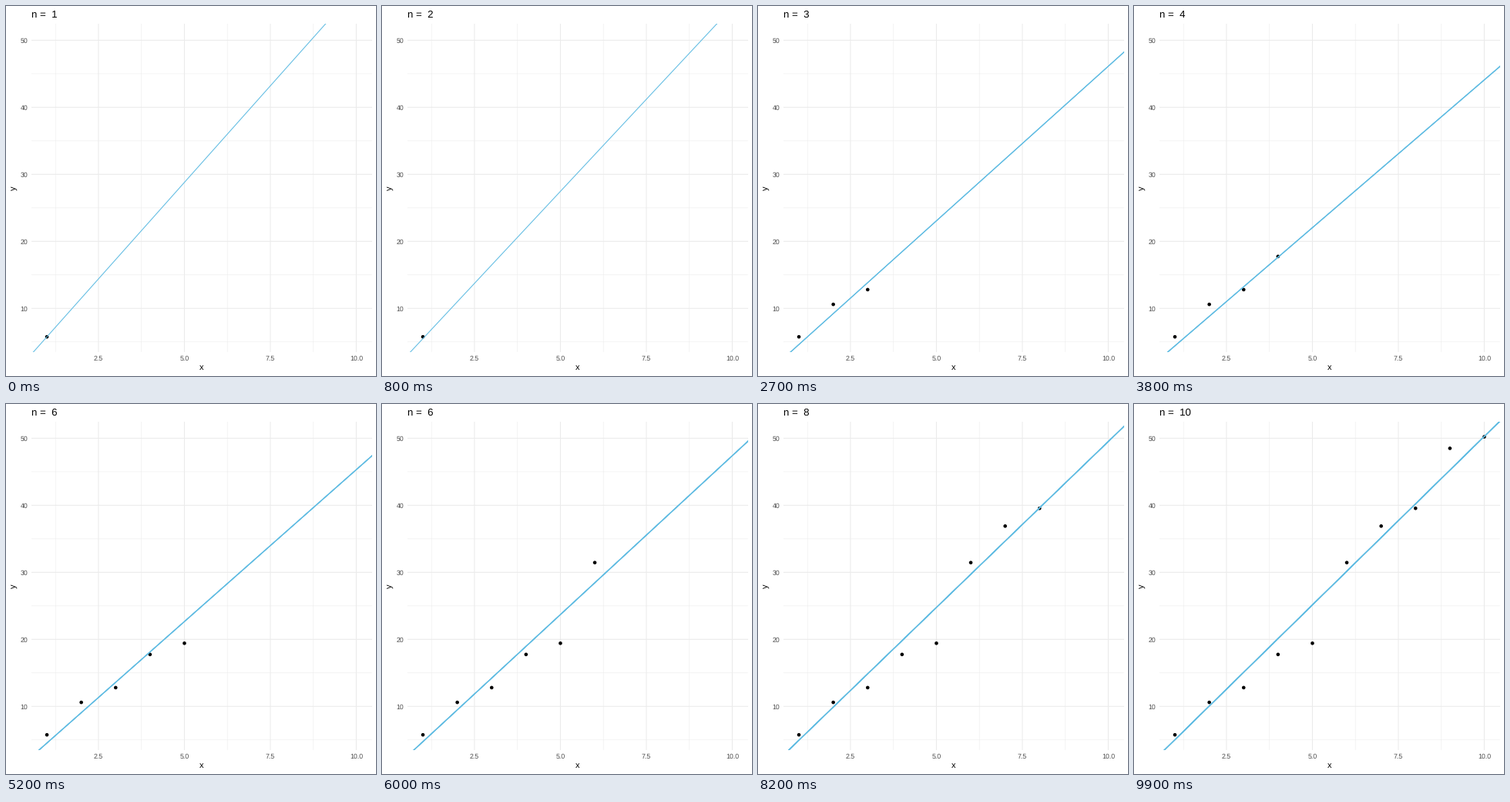
Recreate the animation shown at these times as a matplotlib script. Size 480x480 px, loop 10000 ms.

```python
import numpy as np
import matplotlib.pyplot as plt
from matplotlib.animation import FuncAnimation
from matplotlib.patches import Ellipse

plt.rcParams["font.family"] = "Liberation Sans"
plt.rcParams["text.hinting"] = "none"

SIZE = 480
DPI = 72                      # one point equals one pixel
FRAMES, STEP = 100, 11        # STEP frames from one sample to the next
LEFT, RIGHT, TOP, BOTTOM = 33.0, 474.5, 23.2, 448.5
GRID, LINE, TICK = "#EBEBEB", "#62BDE3", "#4D4D4D"

x = np.arange(1, 11)
y = np.array([5.76, 10.6, 12.8, 17.75, 19.42, 31.45, 36.9, 39.55, 48.5, 50.22])

# Least-squares slope through the origin for the first n samples
slopes = np.cumsum(x * y) / np.cumsum(x * x)


def padded(values):
    pad = 0.05 * (values.max() - values.min())
    return values.min() - pad, values.max() + pad


xlim, ylim = padded(x), padded(y)
x_scale = (RIGHT - LEFT) / (xlim[1] - xlim[0])
y_scale = (BOTTOM - TOP) / (ylim[1] - ylim[0])

fig = plt.figure(figsize=(SIZE / DPI, SIZE / DPI), dpi=DPI, facecolor="white")
ax = fig.add_axes([LEFT / SIZE, 1 - BOTTOM / SIZE,
                   (RIGHT - LEFT) / SIZE, (BOTTOM - TOP) / SIZE])
ax.set(xlim=xlim, ylim=ylim)
ax.axis("off")


def label(px, py, text, size, color="black", ha="center", **kw):
    """Place text with its baseline at pixel (px, py) from the top left."""
    return fig.text(px / SIZE, 1 - py / SIZE, text, fontsize=size,
                    color=color, ha=ha, va="baseline", **kw)


def grid(xs, ys, width):
    style = dict(color=GRID, lw=width, snap=False, zorder=1)
    for v in xs:
        ax.axvline(v, **style)
    for v in ys:
        ax.axhline(v, **style)


x_ticks = np.arange(2.5, 10.1, 2.5)
y_ticks = np.arange(10, 51, 10)
grid(x_ticks - 1.25, y_ticks - 5, 0.53)
grid(x_ticks, y_ticks, 1.07)

for v in x_ticks:
    label(LEFT + (v - xlim[0]) * x_scale, 460, f"{v:.1f}", 8.8, TICK)
for v in y_ticks:
    label(28.1, BOTTOM - (v - ylim[0]) * y_scale + 3.2, str(v), 8.8, TICK, "right")

label((LEFT + RIGHT) / 2, 472.3, "x", 11)
label(13.4, (TOP + BOTTOM) / 2, "y", 11, rotation=90, rotation_mode="anchor")
title = label(LEFT, 15, "", 13.2, ha="left")

DOT = 4.6
dots = [ax.add_patch(Ellipse((a, b), DOT / x_scale, DOT / y_scale,
                             fc="black", lw=0, zorder=2))
        for a, b in zip(x, y)]
# Each visible sample adds one more copy of the fit, which hardens its edges
fits = [ax.plot([], [], color=LINE, lw=1.07, zorder=3)[0] for _ in x]
ends = np.array([xlim[0] - 1, xlim[1] + 1])


def draw(frame):
    n = 1 + frame / STEP
    shown = 1 + frame // STEP
    slope = np.interp(n, x, slopes)
    title.set_text(f"n =  {int(n + 0.5)}")
    for i, (dot, fit) in enumerate(zip(dots, fits)):
        dot.set_visible(i < shown)
        fit.set_visible(i < shown)
        fit.set_data(ends, slope * ends)
    return [title, *dots, *fits]


anim = FuncAnimation(fig, draw, frames=FRAMES, interval=100,
                     repeat=True, repeat_delay=0)
plt.show()
```
